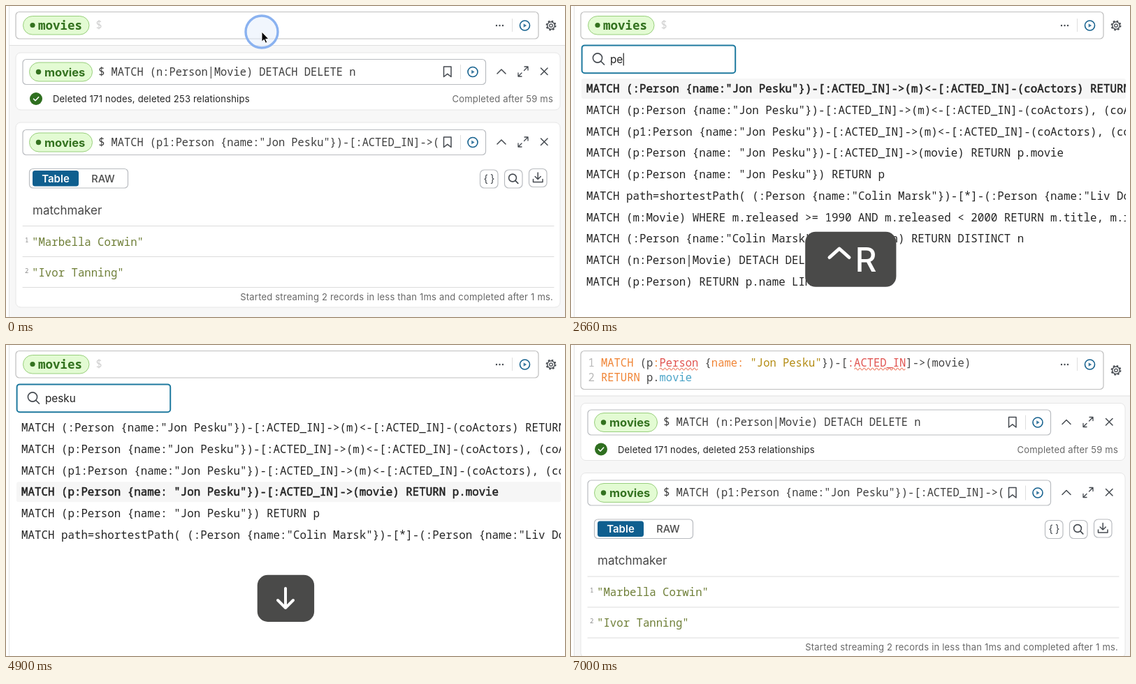
Animation, 800 px wide and 446 px high, one loop 7140 ms. Source, as an HTML page:

```html
<!DOCTYPE html>
<html lang="en">
<head>
<meta charset="utf-8">
<title>Query history search</title>
<style>
html, body { margin: 0; width: 100%; height: 100%; overflow: hidden; background: #fff; }
svg { display: block; width: 100%; height: 100%; }
text { white-space: pre; }
.mono { font-family: "Noto Sans Mono", "DejaVu Sans Mono", monospace; }
.ui { font-family: Inter, "Open Sans", sans-serif; }
.note { font-size: 13px; letter-spacing: .2px; }
.line { fill: none; stroke-linecap: round; stroke-linejoin: round; }
.row { stroke: #232323; stroke-width: 0; }
.row.on { stroke-width: .55px; }
</style>
</head>
<body>
<svg id="stage" viewBox="0 0 800 446"></svg>
<script>
const LOOP = 7140;
const INK = '#454a50', BLUE = '#17628f', GREEN = '#33721f', RULE = '#b9bcc0';
const HERO = 'Jon Pesku', WORD = 'pesku';

const esc = s => s.replace(/&/g, '&amp;').replace(/</g, '&lt;');
const text = (x, y, s, size, fill, cls = 'mono', more = '') =>
  `<text x="${x}" y="${y}" font-size="${size}" fill="${fill}" class="${cls}" ${more}>${esc(s)}</text>`;
const box = (x, y, w, h, r, fill, stroke = 'none', sw = 1.2, id = '') =>
  `<rect ${id && `id="${id}"`} x="${x}" y="${y}" width="${w}" height="${h}" rx="${r}" fill="${fill}" stroke="${stroke}" stroke-width="${sw}"/>`;
const line = (d, stroke = INK, sw = 1.5) =>
  `<path class="line" d="${d}" stroke="${stroke}" stroke-width="${sw}"/>`;
const disc = (x, y, r, fill, stroke = 'none', sw = 1.5) =>
  `<circle cx="${x}" cy="${y}" r="${r}" fill="${fill}" stroke="${stroke}" stroke-width="${sw}"/>`;
const group = (id, body) => `<g id="${id}">${body}</g>`;

const play = (x, y) => disc(x, y, 7, 'none', BLUE, 1.6) +
  `<path d="M${x - 1.8} ${y - 2.7}v5.4l4.4-2.7z" fill="${BLUE}" fill-opacity=".85"/>`;
const lens = (x, y, r) => disc(x, y, r, 'none', INK, 1.6) +
  line(`M${x + r * .72} ${y + r * .72}l${r * .72} ${r * .72}`, INK, 1.7);
const pill = (x, y, w, h) => box(x, y, w, h, h / 2, '#e3fbd3', '#98cf7c', 1);

function cardHead(y, query) {
  const m = y + 18;
  return box(24, y, 662.5, 36, 5, '#fff', RULE) +
    pill(33.5, y + 4.5, 90, 27) + disc(46.5, m, 3.7, GREEN) +
    text(55, m + 6, 'movies', 16.5, GREEN, 'ui', 'font-weight="700"') +
    text(132.2, m + 5, query, 15.35, '#3d3d3d') +
    line(`M626.5 ${m - 7.5}h10.5v14.5l-5.2-4.2l-5.3 4.2z`) +
    line(`M650.5 ${m - 10}v20`, '#dedede', 1) + play(668, m) +
    line(`M703 ${m + 2.5}l6-6l6 6`) +
    line(`M742 ${m - 7.5}h5v5m0-5l-5.5 5.5m-3.5 3.5l-5 5m0-5v5h5`, INK, 1.3) +
    line(`M765.5 ${m - 5.5}l9.5 9.5m0-9.5l-9.5 9.5`);
}

function tableRow(y, n, value) {
  return text(27, y - 5, n, 9, '#8b8b8b') + text(37, y, value, 15.7, '#6f7f38') +
    line(`M24 ${y + 16}h760`, '#dcdcdc', 1);
}

const cards =
  box(5, 56.5, 796, 420, 0, '#f7f7f7') + line('M5 56.5h796', '#dfdfdf', 1) +
  box(14, 67, 779, 82, 7, '#fff', '#e6e6e6', 1) +
  cardHead(76.5, '$ MATCH (n:Person|Movie) DETACH DELETE n') +
  disc(43, 133, 9, '#2f6f20') + line('M39.5 133.2l2.5 2.5l4.6-5', '#fff', 1.6) +
  text(67, 138, 'Deleted 171 nodes, deleted 253 relationships', 13, '#222', 'ui note') +
  text(783, 138, 'Completed after 59 ms', 13, '#686868', 'ui note', 'text-anchor="end"') +
  box(14, 167, 779, 265, 7, '#fff', '#e6e6e6', 1) +
  cardHead(177.5, `$ MATCH (p1:Person {name:"${HERO}"})-[:ACTED_IN]->(`) +
  box(33.5, 233.5, 141, 27.5, 5, '#fff', RULE) + box(38, 236, 66, 22.5, 3.5, '#0f5f8f') +
  text(71, 252.5, 'Table', 15, '#fff', 'ui', 'font-weight="600" text-anchor="middle"') +
  text(139, 252.5, 'RAW', 14.6, '#4a4a4a', 'ui', 'font-weight="500" text-anchor="middle"') +
  box(678.5, 235, 25.5, 26, 6, '#fff', RULE) +
  text(691.2, 252.5, '{ }', 15, INK, 'ui', 'text-anchor="middle" letter-spacing="-.5"') +
  box(713.5, 235, 25.5, 26, 6, '#fff', RULE) + lens(725, 246.5, 5.4) +
  box(748.5, 233.5, 25.5, 26, 6, '#fff', RULE) +
  line('M761.2 239v9.5m-4-4l4 4l4-4M754.5 248.5v4h13.5v-4') +
  text(38, 298.5, 'matchmaker', 17, '#474747', 'ui') +
  line('M24 315.5h760', '#dcdcdc', 1) +
  tableRow(343.5, '1', '"Marbella Corwin"') + tableRow(387.5, '2', '"Ivor Tanning"') +
  text(783, 421.5, 'Started streaming 2 records in less than 1ms and completed after 1 ms.', 13, '#686868', 'ui note', 'text-anchor="end"');

// History search
const CO = '-[:ACTED_IN]->(m)<-[:ACTED_IN]-(coActors)';
const history = [
  `(:Person {name:"${HERO}"})${CO} RETURN coActors`,
  `(p:Person {name:"${HERO}"})${CO}, (coActors)`,
  `(p1:Person {name:"${HERO}"})${CO}, (coActors)`,
  `(p:Person {name: "${HERO}"})-[:ACTED_IN]->(movie) RETURN p.movie`,
  `(p:Person {name: "${HERO}"}) RETURN p`,
  'path=shortestPath( (:Person {name:"Colin Marsk"})-[*]-(:Person {name:"Liv Doran"}))',
  '(m:Movie) WHERE m.released >= 1990 AND m.released < 2000 RETURN m.title, m.released',
  '(:Person {name:"Colin Marsk"})-[*1..3]-(n) RETURN DISTINCT n',
  '(n:Person|Movie) DETACH DELETE n',
  '(p:Person) RETURN p.name LIMIT 20'
];
const PITCH = 30.75;
const search =
  box(15.6, 56.4, 219.6, 39.8, 4, '#fff', '#1f7a9f', 2) + lens(38, 74.5, 6.6) +
  text(56, 82, '', 15.3, '#222', 'ui', 'id="typed"') +
  box(74, 67.5, 1.2, 18, 0, '#222', 'none', 0, 'caret') +
  box(15, 104, 779, 29, 3, '#f6f6f6', 'none', 0, 'mark') +
  `<g clip-path="url(#list)">` +
  history.map((q, i) => text(22, 124 + i * PITCH, 'MATCH ' + q, 15.82, '#232323', 'mono row')).join('') + '</g>';

// Two-line editor
const ORANGE = '#f08435', RED = '#e0524f', CYAN = '#4aa3c7', DARK = '#444', GOLD = '#b38b12';
const spans = list => list.map(([s, c]) => `<tspan fill="${c}">${s}</tspan>`).join('');
const code = (y, n, list) => text(24.5, y, n, 15.47, '#b8b8b8') +
  `<text class="mono" x="43" y="${y}" font-size="15.47">${spans(list)}</text>`;
const wave = (x, w) => {
  let d = `M${x} 34.5`;
  for (let i = 0; i < Math.round(w / 6); i++) d += 'q1.5-3 3 0t3 0';
  return line(d, '#ee7b62', 1.1);
};
const editor =
  code(31, '1', [['MATCH ', ORANGE], ['(p', DARK], [':', ORANGE], ['Person', RED], [' {', DARK],
    ['name:', ORANGE], [` "${HERO}"`, GOLD], ['})-[', DARK], [':ACTED_IN', RED], [']->(movie)', DARK]]) +
  code(52, '2', [['RETURN ', ORANGE], ['p.', DARK], ['movie', CYAN]]) +
  group('waves', wave(127, 56) + wave(406, 72)) +
  box(173, 38, 1.3, 17.5, 0, '#111', 'none', 0, 'edCaret');

const gear = disc(780, 28, 5.2, 'none', INK, 1.4) + disc(780, 28, 2.2, 'none', INK, 1.3) +
  `<circle cx="780" cy="28" r="6.5" fill="none" stroke="${INK}" stroke-width="1.8" stroke-dasharray="2.5 2.605"/>`;
const key = (x, y, w, h) => box(x, y, w, h, 15, '#4a4a49');

const stage = document.getElementById('stage');
stage.innerHTML =
  '<defs><clipPath id="list"><path d="M0 100H794V446H0z"/></clipPath></defs>' +
  box(0, 0, 800, 446, 0, '#fff') +
  group('cards', cards) + group('search', search) +
  line('M4.5 0v446', '#e4e4e4', 1) +
  box(14, 8.5, 748, 38.5, 5, '#fff', '#bfbfbf', 1.2, 'frame') +
  group('prompt', pill(24.5, 14.5, 94.5, 26.5) + disc(38, 27.5, 3.6, GREEN) +
    text(46, 33.5, 'movies', 17.5, GREEN, 'mono', 'font-weight="700"') +
    text(128.5, 33, '$', 15.4, '#cfcfcf')) +
  group('editor', editor) +
  [702, 706.5, 711].map(x => disc(x, 28, 1.2, INK)).join('') +
  line('M724.5 18.5v18', '#dedede', 1) + play(742.5, 28) + group('gear', gear) +
  group('ring', disc(366, 37, 23, '#e3edfc80', '#8ab2f0', 3.4)) +
  group('mouse', '<path d="M366 37v14.2l3.3-2.9l2.2 4.9l2.3-1l-2.2-4.8h4.4z" fill="#000" stroke="#fff" stroke-width="1"/>') +
  group('keyR', key(335.2, 323.8, 130.2, 79) + line('M370 360.5l14-12.5l14 12.5', '#fff', 5) +
    text(406.5, 381, 'R', 48, '#fff', 'ui', 'font-weight="500"')) +
  group('keyDown', key(359.7, 329.8, 81.4, 67.2) + line('M400 349v28m-11-11l11 11l11-11', '#fff', 4)) +
  group('keyEnter', key(346.8, 323.8, 106.4, 79) +
    line('M402 347h11q5 0 5 5v9q0 6-6 6h-30m9-10l-10 10l10 10', '#fff', 4.5));

const el = {};
stage.querySelectorAll('[id]').forEach(n => el[n.id] = n);
const rows = [...stage.querySelectorAll('.row')];

const OPEN = 1450, FILTER = 2870, RUN = 5230, LINT = 6230, FOCUS = 6490;
const strokes = [2380, 2590, 2870, 3080, 3340];
const downs = [3990, 4180, 4410];

const show = (n, on) => n.setAttribute('display', on ? 'inline' : 'none');
const ramp = (t, a, b) => Math.min(1, Math.max(0, (t - a) / (b - a)));
const passed = (list, t) => list.filter(s => t >= s).length;
const blink = (t, since) => Math.floor((t - since) / 510) % 2 === 0;
const fade = (n, v) => { show(n, v > 0); n.setAttribute('opacity', v); };

function draw(t) {
  const searching = t >= OPEN && t < RUN, done = t >= RUN;
  const drop = done ? 16.5 : 0;

  show(el.cards, !searching);
  el.cards.setAttribute('transform', `translate(0 ${drop})`);
  el.gear.setAttribute('transform', `translate(0 ${drop / 2})`);
  el.frame.setAttribute('height', 38.5 + drop);
  show(el.search, searching);
  show(el.prompt, !done);
  show(el.editor, done);
  show(el.mouse, t < OPEN);
  fade(el.ring, 1 - ramp(t, 0, 420));

  if (searching) {
    const typed = passed(strokes, t), sel = passed(downs, t);
    el.typed.textContent = WORD.slice(0, typed);
    const end = typed ? el.typed.getComputedTextLength() : 0;
    el.caret.setAttribute('x', 56.3 + end);
    show(el.caret, blink(t, typed ? strokes[typed - 1] : OPEN));
    el.mark.setAttribute('y', 104 + sel * PITCH);
    rows.forEach((r, i) => {
      show(r, i < 6 || t < FILTER);
      r.classList.toggle('on', i === sel);
    });
  }
  if (done) {
    show(el.waves, t >= LINT);
    show(el.edCaret, blink(t, t < FOCUS ? RUN : FOCUS));
  }

  fade(el.keyR, ramp(t, 980, 1260) - ramp(t, 3010, 3210));
  fade(el.keyDown, t < 5110 ? ramp(t, 3920, 4130) : 0);
  fade(el.keyEnter, t < 5110 ? 0 : ramp(t, 5040, 5250) - ramp(t, 6300, 6510));
}

function tick() {
  draw(performance.now() % LOOP);
  requestAnimationFrame(tick);
}
tick();
</script>
</body>
</html>
```
